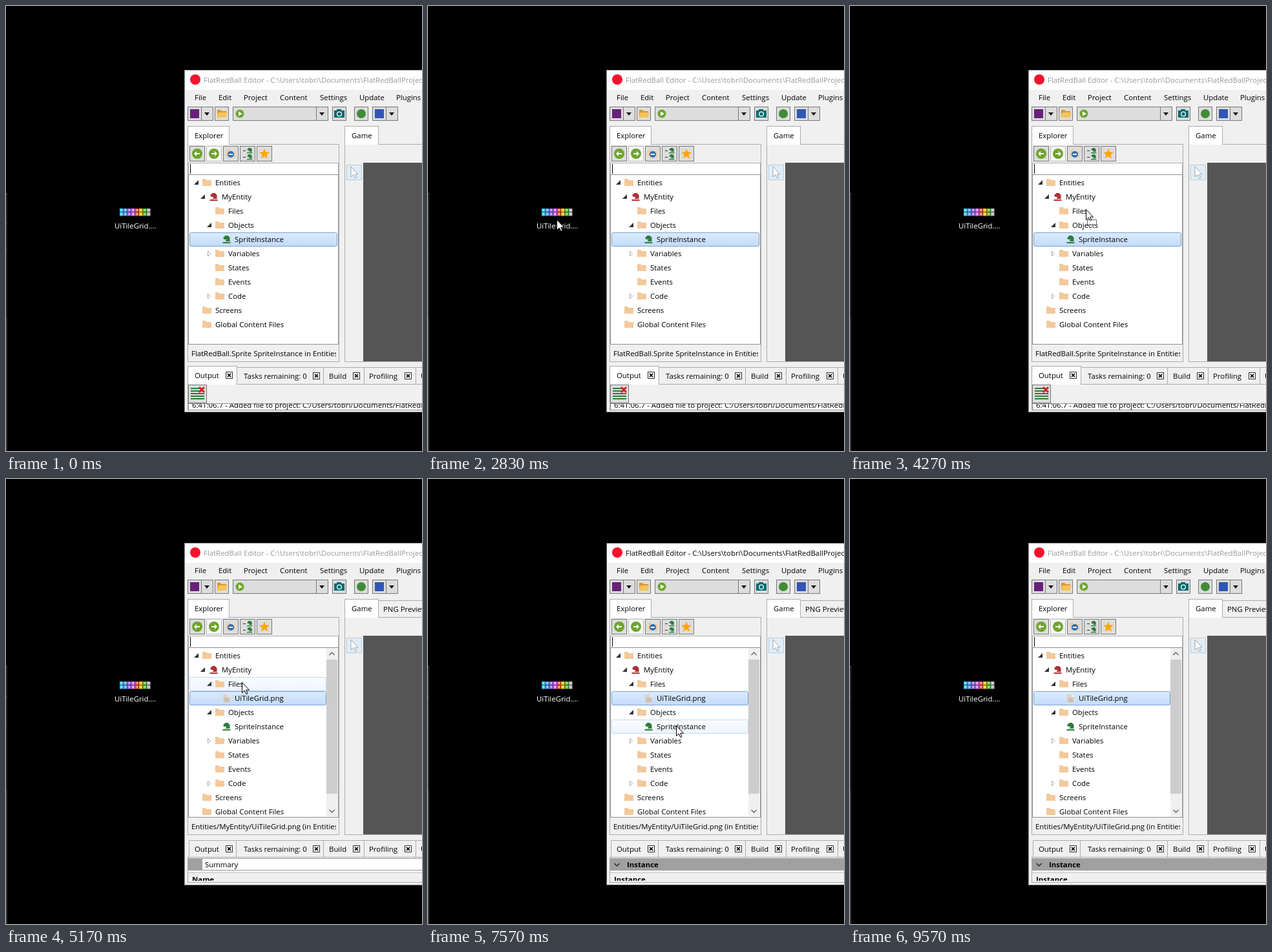
Animation, 644 px wide and 690 px high, one loop 9660 ms. Source, as an HTML page with a canvas:

```html
<!DOCTYPE html>
<html lang="en">
<head>
<meta charset="utf-8">
<title>Dragging a file into the editor</title>
<style>
  html, body { margin: 0; width: 100%; height: 100%; overflow: hidden; background: #000; }
  canvas { display: block; }
</style>
</head>
<body>
<canvas id="stage" width="644" height="690"></canvas>
<script>
const LOOP = 9660;
const ctx = document.getElementById('stage').getContext('2d');
const FONT = '"Open Sans", "Noto Sans", sans-serif';
const GREEN = '#2f7d3c', RED = '#b02f35', FOLDER = '#f3c99c';

// ---- drawing helpers ----
function rect(x, y, w, h, color) {
  ctx.fillStyle = color;
  ctx.fillRect(x, y, w, h);
}
function box(x, y, w, h, fill, border) {
  rect(x, y, w, h, border);
  rect(x + 1, y + 1, w - 2, h - 2, fill);
}
function text(str, x, y, color = '#000', weight = 400) {
  ctx.font = `${weight} 11.4px ${FONT}`;
  ctx.fillStyle = color;
  ctx.fillText(str, x, y);
}
function poly(points, fill, stroke, x = 0, y = 0, closed = true) {
  ctx.beginPath();
  for (let i = 0; i < points.length; i += 2) ctx.lineTo(x + points[i], y + points[i + 1]);
  if (closed) ctx.closePath();
  if (fill) { ctx.fillStyle = fill; ctx.fill(); }
  if (stroke) { ctx.strokeStyle = stroke; ctx.stroke(); }
}
function disc(x, y, r, color) {
  ctx.fillStyle = color;
  ctx.beginPath();
  ctx.arc(x, y, r, 0, 7);
  ctx.fill();
}
function clipped(x, y, w, h, draw) {
  ctx.save();
  ctx.beginPath();
  ctx.rect(x, y, w, h);
  ctx.clip();
  draw();
  ctx.restore();
}

// ---- icons ----
function folder(x, y, color = FOLDER) {
  poly([0, 0, 5, 0, 7, 2, 14, 2, 14, 11, 0, 11], color, null, x, y);
}
function knight(x, y, color, scale = 1) {
  const shape = [1, 3, 4, 0, 8, 0, 11, 3, 11, 9, 4, 9, 6, 6, 3, 6, 1, 5];
  poly(shape.map(v => v * scale), color, null, x, y);
  rect(x, y + 10 * scale, 12 * scale, 2 * scale, color);
}
function page(x, y) {
  poly([0, 0, 7, 0, 11, 4, 11, 13, 0, 13], '#ddd0c5', null, x, y);
  poly([7, 0, 7, 4, 11, 4], '#f5eee8', null, x, y);
  for (const dy of [6, 8, 10]) rect(x + 2, y + dy, 7, 1, '#b9aca2');
}
function arrowDisc(x, y, dir) {
  disc(x, y, 8, '#6ea52d');
  rect(x - 4, y - 1, 8, 2, '#fff');
  poly([5 * dir, 0, dir, -4, dir, 4], '#fff', null, x, y);
}
function dropArrow(x, y) {
  poly([-4, -2, 4, -2, 0, 3], '#111', null, x, y);
}
function chevron(x, y, dir, color, size = 4) {
  ctx.lineWidth = 1.3;
  poly([-size, -2 * dir, 0, 2 * dir, size, -2 * dir], null, color, x, y, false);
  ctx.lineWidth = 1;
}
function closeBox(x, y) {
  box(x, y, 11, 11, '#f4f4f4', '#333');
  ctx.lineWidth = 1.7;
  poly([3, 3, 8, 8], null, '#000', x, y, false);
  poly([8, 3, 3, 8], null, '#000', x, y, false);
  ctx.lineWidth = 1;
}

function desktopFile(dx, dy, alpha) {
  const colors = ['#43c6f4', '#5ba5f7', '#9b70ef', '#d673ed', '#ef643d', '#f2bd20', '#59c83a', '#b5b5b5'];
  ctx.save();
  ctx.globalAlpha = alpha;
  ctx.translate(dx, dy);
  colors.forEach((color, i) => {
    for (const y of [314, 320]) {
      rect(176 + i * 6, y, 5.5, 5.5, color);
      rect(178 + i * 6, y + 1.5, 2, 2, 'rgba(255,255,255,.65)');
    }
  });
  text('UiTileGrid....', 168, 345, '#fff');
  ctx.restore();
}

function cursor({ x, y }, dragging) {
  poly([.5, .5, .5, 16.5, 4.3, 13, 6.8, 18.5, 9, 17.5, 6.7, 12.2, 11.5, 12.2], '#fff', '#000', x, y);
  if (!dragging) return;
  rect(x + 3, y + 17, 14, 8, 'rgba(255,255,255,.6)');
  ctx.setLineDash([2, 1]);
  ctx.strokeStyle = '#222';
  ctx.strokeRect(x + 2.5, y + 16.5, 14, 8);
  ctx.setLineDash([]);
}

// ---- motion ----
const smooth = u => u * u * (3 - 2 * u);
const out = power => u => 1 - (1 - u) ** power;
const MOVES = [ // start, end, target x, target y, easing for x, easing for y
  [1470, 2400, 199, 331, out(1.75), out(2.2)],
  [2770, 3530, 357, 328, u => smooth(u ** 2.3)],
  [3670, 4270, 365, 315, smooth],
  [5330, 5530, 397, 342, smooth],
  [5670, 5900, 405, 342, smooth],
  [6130, 6800, 384, 382, smooth],
  [8500, 9100, 198, 691, u => u ** 1.4]
];
function cursorAt(t) {
  let x = 21, y = 691;
  for (const [start, end, toX, toY, easeX, easeY = easeX] of MOVES) {
    if (t < start) break;
    const u = Math.min(1, (t - start) / (end - start));
    x += (toX - x) * easeX(u);
    y += (toY - y) * easeY(u);
  }
  return { x: Math.round(x), y: Math.round(y) };
}

// ---- window parts ----
function toolbar() {
  const button = (x, w) => box(x, 156, w, 22, '#ddd', '#777');
  button(281, 22); rect(285, 160, 14, 14, '#68217a');
  button(302, 19); dropArrow(311, 167);
  button(323, 22);
  folder(327, 161, '#d99a2b');
  poly([3, 5, 17, 5, 14, 13, 0, 13], '#f5c35b', null, 326, 160);
  button(351, 148);
  disc(362, 167, 6.5, '#6ea52d');
  poly([-2, -3.5, 4, 0, -2, 3.5], '#fff', null, 362, 167);
  button(480, 19); dropArrow(489, 167);
  button(505, 22);
  rect(508, 162, 16, 11, '#006b70'); rect(512, 160, 7, 3, '#006b70');
  disc(516, 167.5, 4, '#fff'); disc(516, 167.5, 2.7, '#006b70');
  button(539, 22); disc(550, 167, 7, '#3f8c38');
  button(567, 22); rect(571, 160, 14, 14, '#3155b5');
  button(588, 19); dropArrow(597, 167);
}

function explorerButtons() {
  for (let i = 0; i < 5; i++)
    box(284 + i * 26, 217, 24, 24, i === 1 ? '#f6f6f6' : '#ddd', i === 1 ? '#bcbcbc' : '#777');
  arrowDisc(296, 229, -1);
  arrowDisc(322, 229, 1);
  folder(341, 223, FOLDER);
  disc(348, 230, 5, '#2f6fb0'); rect(345, 229, 6, 2, '#fff');
  for (const y of [220, 230]) {
    knight(373, y, GREEN, .7);
    rect(367, y + 4, 4, 1, '#333');
  }
  const star = [];
  for (let i = 0; i < 10; i++) {
    const r = i % 2 ? 3.7 : 8.5, a = i * Math.PI / 5;
    star.push(r * Math.sin(a), -r * Math.cos(a));
  }
  poly(star, '#ffa50a', null, 400, 229.5);
}

function highlight(row, right, top, bottom, border) {
  const y = 263 + row * 22, fill = ctx.createLinearGradient(0, y, 0, y + 22);
  fill.addColorStop(0, top);
  fill.addColorStop(1, bottom);
  ctx.beginPath();
  ctx.roundRect(284.5, y + .5, right - 285, 21, 2);
  ctx.fillStyle = fill;
  ctx.fill();
  ctx.strokeStyle = border;
  ctx.stroke();
}

// label, depth, expander (1 open, -1 closed, 0 none), icon
const TREE = [
  ['Entities', 0, 1], ['MyEntity', 1, 1, 'entity'], ['Files', 2, 0], ['Objects', 2, 1],
  ['SpriteInstance', 3, 0, 'object'], ['Variables', 2, -1], ['States', 2, 0], ['Events', 2, 0],
  ['Code', 2, -1], ['Screens', 0, 0], ['Global Content Files', 0, 0]
];
const TREE_WITH_FILE = [
  ...TREE.slice(0, 2), ['Files', 2, 1], ['UiTileGrid.png', 3, 0, 'file'], ...TREE.slice(3)
];

function tree(added, hoverRow) {
  const right = added ? 496 : 513;
  box(282, 261, 233, 264, '#fff', '#8b8f96');
  clipped(283, 262, 231, 261, () => {
    if (hoverRow >= 0) highlight(hoverRow, right, '#fbfcfe', '#edf4fd', '#bfdaf5');
    highlight(added ? 3 : 4, right, '#dcebfc', '#c1dbfb', '#7da2ce');
    (added ? TREE_WITH_FILE : TREE).forEach(([label, depth, expander, icon], i) => {
      const y = 274 + i * 22, x = 304 + depth * 10;
      if (expander > 0) poly([-7, 3, 0, 3, 0, -4], '#333', null, x - 6, y);
      if (expander < 0) poly([-7.5, -4, -7.5, 4, -3.5, 0], '#fff', '#aaa', x - 4, y);
      if (icon === 'file') page(x + 2, y - 6);
      else if (icon) knight(x + 1.5, y - 6, icon === 'entity' ? RED : GREEN);
      else folder(x, y - 6);
      text(label, x + 20, y + 4);
    });
    if (!added) return;
    rect(496, 262, 17, 261, '#f0f0f0');
    rect(496, 280, 17, 208, '#cdcdcd');
    chevron(504.5, 271, -1, '#606060');
    chevron(504.5, 515, 1, '#606060');
  });
}

function bottomPanel(mode) {
  rect(281, 586, 363, 1, '#acacac');
  rect(281, 586, 1, 41, '#acacac');
  const tabs = [['Output', 283, 74, 292, 340], ['Tasks remaining: 0', 356, 136, 368, 475],
    ['Build', 491, 64, 500, 537], ['Profiling', 554, 81, 562, 617], ['Unreferenced', 634, 40, 642]];
  for (const [label, x, w, textX, closeX] of tabs) {
    box(x, 560, w, 27, '#f0f0f0', '#acacac');
    text(label, textX, 578);
    if (closeX) closeBox(closeX, 568);
  }
  if (mode === 'output') {
    box(281, 558, 77, 29, '#fff', '#acacac');
    rect(282, 586, 75, 1, '#fff');
    text('Output', 292, 577);
    closeBox(340, 567);
    box(282, 587, 29, 29, '#ddd', '#777');
    for (let i = 0; i < 5; i++) rect(286, 592 + i * 4, 21, 2, GREEN);
    ctx.lineWidth = 2.5;
    poly([299, 591, 307, 599], null, '#e11b22', 0, 0, false);
    poly([307, 591, 299, 599], null, '#e11b22', 0, 0, false);
    ctx.lineWidth = 1;
    box(282, 616, 370, 11, '#fff', '#8b8f96');
    clipped(283, 617, 361, 9, () =>
      text('6:41:06.7 - Added file to project: C:/Users/tobri/Documents/FlatRedBallProjects', 288, 623));
    return;
  }
  const summary = mode === 'summary';
  rect(282, 588, 362, 19, '#a0a0a0');
  if (summary) {
    rect(304, 589, 340, 17, '#fff');
    text('Summary', 308, 602);
  } else {
    chevron(292.5, 598, 1, '#222');
    text('Instance', 308, 602, '#000', 700);
  }
  rect(282, 607, 362, 19, '#f0f0f0');
  rect(282, 610, 362, 1, '#c4c4c4');
  clipped(282, 612, 362, 11, () => text(summary ? 'Name' : 'Instance', 288, 625, '#000', 700));
  rect(282, 625, 362, 1, '#acacac');
}

function editor({ active, added, preview, panel, hoverRow }) {
  box(276, 99, 380, 531, '#f0f0f0', active ? '#555' : '#8a8a8a');
  rect(277, 100, 367, 30, '#fff');
  disc(293, 114, 8, '#f5122d');
  text('FlatRedBall Editor - C:\\Users\\tobri\\Documents\\FlatRedBallProjects', 306, 119, active ? '#000' : '#999');
  [['File', 292], ['Edit', 329], ['Project', 368], ['Content', 424], ['Settings', 486],
    ['Update', 547], ['Plugins', 604]].forEach(([label, x]) => text(label, x, 146));
  toolbar();

  box(281, 214, 235, 338, '#f0f0f0', '#acacac');
  box(281, 186, 65, 29, '#fff', '#acacac');
  rect(282, 214, 63, 1, '#fff');
  text('Explorer', 292, 205);
  explorerButtons();
  box(282, 243, 233, 19, '#fff', '#abadb3');
  rect(285, 245, 1, 15, '#000');
  tree(added, hoverRow);
  clipped(282, 526, 229, 24, () => text(added
    ? 'Entities/MyEntity/UiTileGrid.png (in Entities'
    : 'FlatRedBall.Sprite SpriteInstance in Entities', 287, 543));

  box(524, 214, 130, 338, '#f0f0f0', '#acacac');
  if (preview) {
    box(576, 188, 80, 27, '#f0f0f0', '#acacac');
    text('PNG Preview', 584, 206);
  }
  box(524, 186, 53, 29, '#fff', '#acacac');
  rect(525, 214, 51, 1, '#fff');
  text('Game', 535, 205);
  rect(553, 243, 91, 308, '#555');
  box(527, 246, 24, 24, '#e1edf6', '#b7cddd');
  poly([0, 0, 0, 16, 4, 12.5, 6.5, 18, 9, 17, 6.5, 12, 11, 12], '#fff', '#9aa4ac', 534, 249);
  bottomPanel(panel);
}

function draw(t) {
  const pointer = cursorAt(t), { x, y } = pointer;
  const draggingFile = t >= 2770 && t < 4700;
  const overWindow = x >= 277;
  const dragging = (draggingFile && overWindow) || (t >= 6130 && t < 7330);

  rect(0, 0, 644, 690, '#000');
  rect(0, 290, 2, 193, '#242424');
  rect(0, 483, 2, 207, '#353535');
  for (const tick of [290, 337, 377]) rect(0, tick, 2, 1, '#484848');

  if (t < 2770 && x >= 163 && x < 238 && y >= 275 && y < 353)
    box(163, 275, 75, 78, '#202020', '#343434');
  desktopFile(0, 0, 1);

  let hoverRow = -1;
  if (t >= 4800 && t < 5530 && y < 329) hoverRow = 2;
  if (t >= 7330 && y < 395) hoverRow = 5;
  editor({
    active: t >= 6130 && t < 9570,
    added: t >= 4800,
    preview: t >= 4950,
    panel: t < 4950 ? 'output' : t < 7430 ? 'summary' : 'instance',
    hoverRow
  });
  if (draggingFile && !overWindow && x > 199) desktopFile(x - 199, y - 331, .65);
  cursor(pointer, dragging);
}

function frame() {
  draw(performance.now() % LOOP);
  requestAnimationFrame(frame);
}
frame();
</script>
</body>
</html>
```
